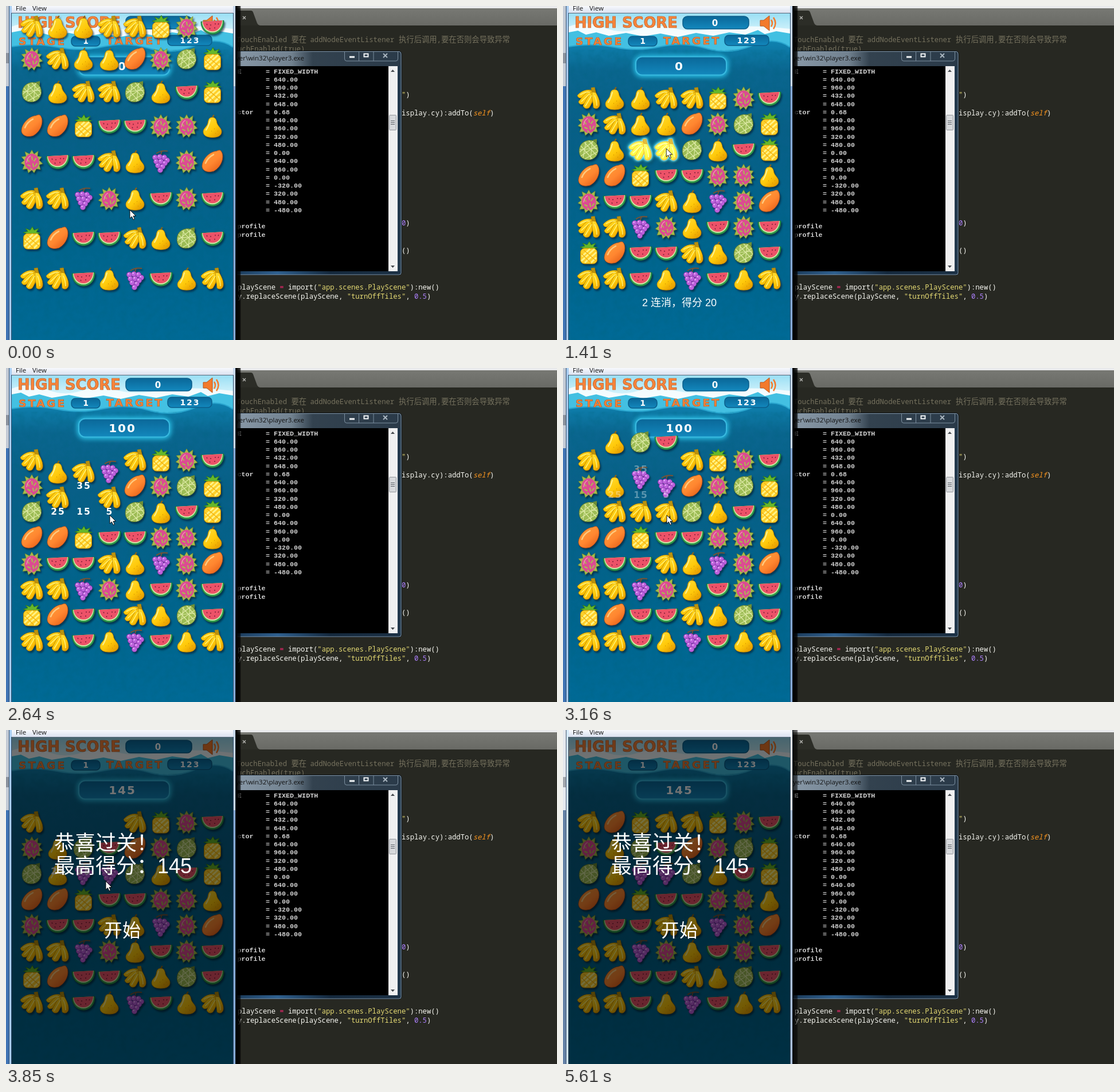
Recreate the animation shown at these times as an HTML page. Size 961 px wide and 583 px high, loop 5710 ms.

```html
<!DOCTYPE html>
<html lang="zh">
<head>
<meta charset="utf-8">
<title>Fruit match</title>
<style>
html, body { margin: 0; width: 100%; height: 100%; overflow: hidden; background: #272822; }
svg { display: block; }
text { white-space: pre; }
.code { font: 12.22px "Noto Sans Mono", "DejaVu Sans Mono", monospace; fill: #f8f8f2; }
.cjk { font: 13.33px "Noto Sans CJK SC", "Noto Sans CJK", sans-serif; }
.note { fill: #75715e; }
.str { fill: #e6db74; }
.num { fill: #ae81ff; }
.op { fill: #f92672; }
.self { fill: #fd971f; font-style: italic; }
.term { font: bold 11.7px "Liberation Mono", "DejaVu Sans Mono", monospace; fill: #d2d2d2; }
.ui { font: 11.5px "Open Sans", "Noto Sans", sans-serif; fill: #111; }
.head { font: bold 25.8px "DejaVu Sans", sans-serif; fill: #f6843a; stroke: #b85a26; stroke-width: .7; }
.sub { font-size: 18.5px; letter-spacing: 3.4px; }
.digits { font: bold 20px "DejaVu Sans", sans-serif; fill: #fff; text-anchor: middle; letter-spacing: 2px; }
.msg { font: 18px "Liberation Sans", "Noto Sans CJK SC", "Noto Sans CJK", sans-serif; fill: #fff; }
.big { font-size: 36px; font-weight: 300; }
#board { filter: drop-shadow(2px 3px 1.5px rgba(0, 25, 45, .6)); }
.lit { filter: saturate(.75) brightness(1.3) drop-shadow(0 0 1px #dff) drop-shadow(0 0 2px #8ff) drop-shadow(0 0 3px #3ce8ff); }
</style>
</head>
<body>
<svg id="stage" width="961" height="583" viewBox="0 0 961 583">
<defs>
  <linearGradient id="bar" x2="0" y2="1"><stop stop-color="#797a75"/><stop offset="1" stop-color="#696a65"/></linearGradient>
  <linearGradient id="menu" x2="0" y2="1"><stop stop-color="#f7f9fd"/><stop offset="1" stop-color="#d8dfee"/></linearGradient>
  <linearGradient id="glass"><stop stop-color="#8d9dac"/><stop offset=".38" stop-color="#71818f"/><stop offset=".5" stop-color="#33424f"/><stop offset="1" stop-color="#2a3a49"/></linearGradient>
  <linearGradient id="base"><stop stop-color="#16304a"/><stop offset=".3" stop-color="#2e5f8e"/><stop offset=".6" stop-color="#14283c"/><stop offset="1" stop-color="#1c3145"/></linearGradient>
  <linearGradient id="sky" x2="0" y2="1"><stop stop-color="#9adff4"/><stop offset=".6" stop-color="#e6f9fe"/><stop offset="1" stop-color="#c8effa"/></linearGradient>
  <linearGradient id="sea" x2="0" y2="1"><stop stop-color="#0f82b0"/><stop offset=".1" stop-color="#0a668f"/><stop offset=".3" stop-color="#085f87"/><stop offset=".7" stop-color="#01658e"/><stop offset="1" stop-color="#006a96"/></linearGradient>
  <linearGradient id="pill" x2="0" y2="1"><stop stop-color="#0a6798"/><stop offset="1" stop-color="#1388bd"/></linearGradient>
  <linearGradient id="shade"><stop stop-color="#000"/><stop offset=".8" stop-color="#000" stop-opacity=".75"/><stop offset="1" stop-color="#000" stop-opacity="0"/></linearGradient>
  <linearGradient id="peel" x2=".8" y2="1"><stop stop-color="#ffe03a"/><stop offset=".6" stop-color="#ffc90a"/><stop offset="1" stop-color="#e59a00"/></linearGradient>
  <linearGradient id="ripe" x2=".8" y2="1"><stop stop-color="#ffa53c"/><stop offset=".6" stop-color="#ff8630"/><stop offset="1" stop-color="#e55f18"/></linearGradient>
  <filter id="glow" x="-20%" y="-50%" width="140%" height="200%"><feGaussianBlur stdDeviation="4"/></filter>
  <filter id="grain" x="0" y="0" width="1" height="1">
    <feTurbulence type="fractalNoise" baseFrequency=".09" numOctaves="3" seed="4"/>
    <feColorMatrix values="0 0 0 0 0  0 0 0 0 .12  0 0 0 0 .2  .9 0 0 0 -.33"/>
  </filter>
  <clipPath id="view"><rect x="10" y="13" width="386" height="570"/></clipPath>

  <g id="B" fill="url(#peel)" stroke="#b98200" stroke-width=".9" stroke-linejoin="round">
    <path d="M6-14C-4-16-13-13-20-5C-19 0-14 1-10-2C-3-7 4-8 8-10Z"/>
    <path d="M6-14C-5-11-10-4-18 6C-17 11-12 12-8 9C0 3 5-4 9-10Z"/>
    <path d="M6-13C-1-6-5 4-10 13C-8 19-2 19 1 16C6 8 9 0 10-10Z"/>
    <path d="M6-12C4 0 8 8 8 16C12 20 18 18 19 12C20 4 15-5 11-12Z"/>
    <path d="M4-18L10-19L12-10L6-11Z" fill="#b8930f"/>
    <path d="M-15-6Q-7-11 2-11M-13 6Q-5-2 2-8M-6 14Q0 4 5-5M14 13Q14 4 10-5" fill="none" stroke="#fff27c" stroke-width="1.5"/>
  </g>
  <g id="P">
    <path d="M0-13Q0-17 3-19" fill="none" stroke="#8a6415" stroke-width="2.2"/>
    <path d="M0-15C6-15 7-10 8-5C10 1 16 4 16 10C16 17 9 20 0 20C-9 20-16 17-16 10C-16 4-9 1-8-5C-7-11-6-15 0-15Z" fill="url(#peel)" stroke="#c08600" stroke-width=".9"/>
    <path d="M-4-10Q-7 1-11 7" fill="none" stroke="#fff08a" stroke-width="2.2" stroke-linecap="round"/>
    <path d="M3 5h1M9 9h1M5 13h1M-2 9h1" stroke="#d39400" stroke-width="1.3"/>
  </g>
  <g id="A">
    <path d="M-3-6L-15-10L-7-12L-11-17L-3-14L1-20L4-14L12-17L8-11L15-9L4-6Z" fill="#66b72a" stroke="#2f7d1c" stroke-width=".9"/>
    <rect x="-14.500" y="-8" width="29" height="27" rx="7" fill="#ffd02a" stroke="#c98c00"/>
    <path d="M-12 6L2-7M-13 14L10-7M-7 17L13-1M3 18L13 8" stroke="#fff387" stroke-width="3"/>
    <path d="M-9-5L13 14M-13 1L4 18" stroke="#f0ad10" stroke-width="1.200"/>
  </g>
  <g id="D">
    <path d="M0-20L4-13L11-18L10-9L17-8L13-2L19 4L13 6L15 14L8 13L4 20L0 15L-6 20L-8 13L-16 14L-13 6L-19 3L-13-2L-18-8L-10-9L-12-17L-4-13Z" fill="#a4bb4c" stroke="#72852c" stroke-width=".7"/>
    <ellipse cy="1" rx="12.500" ry="14.500" fill="#dc4b92"/>
    <path d="M-8-4l3 4M0-8l1 5M7-5l-3 4M-7 6l4 2M2 4l1 5M9 4l-3 4M-2 12l2 2" stroke="#a8bf4f" stroke-width="2" stroke-linecap="round"/>
    <path d="M-9 2Q-8-7-2-10" fill="none" stroke="#f487b6" stroke-width="1.500"/>
  </g>
  <g id="W">
    <path d="M-20-9L20-11C21 4 11 13 0 13C-11 13-20 4-20-9Z" fill="#2e9a4c" stroke="#1a6c37" stroke-width=".8"/>
    <path d="M-18-9L18-11C18 2 10 10 0 10C-10 10-18 2-18-9Z" fill="#cfe9a6"/>
    <path d="M-17-9L17-11C16 1 9 8 0 8C-9 8-16 1-17-9Z" fill="#ec5268"/>
    <path d="M-10-5l1 2M-3-4l0 2M5-6l0 2M11-6l-1 2M-5 2l1 2M4 1l0 2" stroke="#7c1f38" stroke-width="1.500"/>
  </g>
  <g id="M">
    <path d="M15-18C22-9 16 10 2 17C-8 20-17 17-18 9C-18-4-5-17 7-18C11-20 14-20 15-18Z" fill="url(#ripe)" stroke="#b9501a" stroke-width=".9"/>
    <path d="M-12 3Q-8-7 2-12" fill="none" stroke="#ffcb80" stroke-width="2.500" stroke-linecap="round"/>
  </g>
  <g id="L">
    <path d="M6-17L14-19L14-11Z" fill="#6e8f36"/>
    <path d="M9-15C17-10 19 2 13 11C8 18-5 20-12 14C-19 8-18-5-12-11C-6-17 3-18 9-15Z" fill="#9dbc55" stroke="#5f7d30"/>
    <path d="M-14-7L6 16M-8-13L13 9M0-16L16 2M-16 4L8-15M-14 11L14-8M-7 16L16 3M-5-14L-10 14M6-15L3 17M-16 0L15-3" fill="none" stroke="#dce9a4" stroke-width="1.200"/>
  </g>
  <g id="G">
    <path d="M-1-10L2-18M-8-14Q0-20 12-18" fill="none" stroke="#7b5232" stroke-width="1.800"/>
    <g id="berries" fill="#bd62dc" stroke="#7f35a4" stroke-width=".7"/>
  </g>
</defs>

<rect width="961" height="583" fill="#272822"/>
<rect width="961" height="34" fill="url(#bar)"/>
<rect width="961" height="4" fill="#e9eaec"/>
<path d="M396 8H427Q430 8 431 11L438 30Q440 34 444 34H396Z" fill="#2c2d27"/>
<path d="M413 18l5 5m0-5l-5 5" stroke="#b9b9b5" stroke-width="1.300"/>
<text class="code note" y="63"><tspan x="402">TouchEnabled</tspan><tspan class="cjk" x="497.500">要在</tspan><tspan x="530.500">addNodeEventListener</tspan><tspan class="cjk" x="685">执行后调用</tspan><tspan x="751.500">,</tspan><tspan class="cjk" x="759">要在否则会导致异常</tspan></text>
<text class="code note" x="404" y="79">uchEnabled(true)</text>
<text class="code" x="690" y="159"><tspan class="str">"</tspan>)</text>
<text class="code" x="690" y="191">isplay.cy):addTo(<tspan class="self">self</tspan>)</text>
<text class="code" x="690" y="383"><tspan class="num">0</tspan>)</text>
<text class="code" x="690" y="431">()</text>
<text class="code" x="404" y="495">playScene <tspan class="op">=</tspan> import(<tspan class="str">"app.scenes.PlayScene"</tspan>):new()</text>
<text class="code" x="404" y="511">y.replaceScene(playScene, <tspan class="str">"turnOffTiles"</tspan>, <tspan class="num">0.5</tspan>)</text>

<g id="console">
  <rect x="380" y="78.500" width="310" height="391" rx="5" fill="#22384c" stroke="#0b1117"/>
  <rect x="381" y="80" width="308" height="25" rx="4" fill="url(#glass)"/>
  <rect x="381" y="463" width="308" height="6" fill="url(#base)"/>
  <path d="M400 79.500H686Q689 80 689 84V466Q689 469 685 469H400" fill="none" stroke="#9db2c4" stroke-opacity=".8"/>
  <text class="ui" x="401" y="95">yer\win32\player3.exe</text>
  <path d="M590.500 79V92Q590.500 96 594 96H680Q683.500 96 683.500 92V79M615.500 80V96M641 80V96" fill="none" stroke="#7d90a0"/>
  <path d="M599 89h9" stroke="#f3f6f8" stroke-width="3"/>
  <rect x="624.500" y="83.500" width="7" height="5" fill="none" stroke="#f3f6f8" stroke-width="2"/>
  <path d="M658 83l7 7m0-7l-7 7" stroke="#a9b5bf" stroke-width="2"/>
  <rect x="390" y="105" width="293" height="358" fill="#000"/>
  <rect x="667" y="105" width="16" height="358" fill="#f0f0f1"/>
  <rect x="668.500" y="190.500" width="12" height="26" rx="1" fill="#d7d9dc" stroke="#93979c"/>
  <path d="M671 200.500h7m-7 3h7m-7 3h7" stroke="#5b6066"/>
  <path d="M671 115l3.500-4 3.500 4zM671 453l3.500 4 3.500-4z" fill="#45494e"/>
  <g id="log" class="term"></g>
</g>

<rect id="edge" x="401" width="9" height="583" fill="url(#shade)"/>
<g id="frame">
  <rect width="401" height="583" fill="#c9d9ec"/>
  <rect width="5" height="140" fill="#c3cad5"/>
  <rect y="82" width="5" height="18" fill="#8b929d"/>
  <rect y="140" width="5" height="443" fill="#3f73b4"/>
  <rect x="5" width="5" height="583" fill="#a9cdf0"/>
  <rect x="396" y="140" width="4" height="443" fill="#86abd8"/>
  <path d="M5.500 0V583M9.500 12V583M396.500 12V583" stroke="#34506f"/>
</g>
<path d="M400.500 0V583" stroke="#10161c"/>
<rect x="10" width="386" height="13" fill="url(#menu)"/>
<path d="M10 12.500H396" stroke="#58697b"/>
<text class="ui" x="17" y="8">File</text><text class="ui" x="46" y="8">View</text>

<g clip-path="url(#view)">
  <rect x="10" y="13" width="386" height="70" fill="url(#sky)"/>
  <path d="M10 36Q40 24 70 37T130 40T190 38T250 42T310 36T396 40V60H10Z" fill="#fff" opacity=".75"/>
  <path d="M10 46L26 43L40 50L58 46L80 52L110 47L140 53L170 48L200 54L232 47L262 52L290 46L318 50L340 42L352 49L372 44L396 48V90H10Z" fill="#43c0e2"/>
  <path d="M10 71Q50 64 90 72T170 71T250 74T330 69T396 72V583H10Z" fill="url(#sea)"/>
  <path d="M10 71Q50 64 90 72T170 71T250 74T330 69T396 72" fill="none" stroke="#2aa6cf" stroke-width="2"/>
  <rect x="10" y="76" width="386" height="507" filter="url(#grain)" opacity=".55"/>
  <text class="head" x="20" y="38">HIGH SCORE</text>
  <text class="head sub" x="22" y="68">STAGE</text>
  <text class="head sub" x="175" y="67">TARGET</text>
  <g fill="url(#pill)" stroke="#0b5d8a" stroke-width="1.500">
    <rect x="209" y="18" width="115" height="22" rx="8"/>
    <rect x="114" y="53" width="50" height="17" rx="7"/>
    <rect x="282" y="51" width="77" height="18" rx="7"/>
  </g>
  <rect x="124" y="86" width="164" height="38" rx="14" fill="#2cc3ea" filter="url(#glow)"/>
  <rect x="127" y="88.500" width="158" height="32" rx="11" fill="url(#pill)" stroke="#39b9df" stroke-width="2"/>
  <g class="digits">
    <text x="266" y="34.500" font-size="15">0</text>
    <text x="140" y="66" style="font-size:14px">1</text>
    <text x="321" y="65" style="font-size:14px">123</text>
    <text id="score" x="203" y="112">0</text>
  </g>
  <path d="M344 25h6l10-8v26l-10-8h-6z" fill="#f37a2b" stroke="#b9541b"/>
  <path d="M363 24q4 6 0 12M367 20q7 10 0 20" fill="none" stroke="#f37a2b" stroke-width="2.500"/>
  <g id="board"></g>
  <g id="pops" class="digits"></g>
  <text id="msg" class="msg" x="203" y="524" text-anchor="middle"></text>
  <g id="dialog">
    <rect x="10" y="13" width="386" height="570" opacity=".55"/>
    <text class="msg big" x="84" y="210">恭喜过关！</text>
    <text class="msg big" x="84" y="250">最高得分：145</text>
    <text class="msg big" x="203" y="361" text-anchor="middle" style="font-size:32px">开始</text>
  </g>
</g>
<path id="cursor" d="M0 0V14.500L3.400 11.500L6 17L8.300 16L6 10.500H10.500Z" fill="#fff" stroke="#000" stroke-width=".9"/>
</svg>
<script>
const LOOP = 5710, HALF = 290, SPEED = .579;
const byId = id => document.getElementById(id);
const add = (parent, tag, attrs = {}, text) => {
  const el = document.createElementNS('http://www.w3.org/2000/svg', tag);
  for (const k in attrs) el.setAttribute(k, attrs[k]);
  if (text !== undefined) el.textContent = text;
  return parent.appendChild(el);
};
const show = (el, on) => el.setAttribute('display', on ? 'inline' : 'none');
const colX = c => 45 + 45 * c, rowY = r => 161 + 45 * r;

// Screen refresh times
const ticks = [0, 130, 270, 400, 550, 680, 830, 990, 1140, 1290, 1410, 1530, 1680, 1830, 1960, 2100, 2220,
  2370, 2500, 2640, 2770, 2920, 3040, 3160, 3310, 3450, 3580, 3700, 3850, 4000, 4130, 4280, 4400, 4520,
  4670, 4820, 4940, 5060, 5610];

const path = [[0, 216, 356], [400, 216, 356], [680, 186, 347], [830, 180, 340], [990, 173, 297], [1140, 178, 256],
  [1290, 180, 250], [1960, 181, 243], [2220, 181, 243], [2640, 181, 257], [3450, 181, 257], [3700, 174, 260],
  [3850, 174, 264], [4130, 181, 282], [4400, 192, 307], [4520, 202, 336], [4670, 205, 346], [4820, 300, 420],
  [4940, 665, 570]];

// Each clear: picked cells as [column, row], new fruit per column from the top
const clears = [
  { lit: 1290, at: 1490, cells: [[3, 2], [2, 2]], fresh: { 2: 'B', 3: 'G' } },
  { lit: 2370, at: 2605, cells: [[3, 2], [2, 2], [1, 2], [2, 1]], fresh: { 1: 'P', 2: 'LG', 3: 'W' } },
  { lit: 3520, at: 3740, cells: [[3, 2], [2, 2], [1, 2]], fresh: { 1: 'M', 2: 'A', 3: 'B' } }
];
const layout = ['BPPBBADW', 'DBPPMDLA', 'LPBBLPWA', 'MMAWWDDP', 'DWWBPGDM', 'BBGDPWDW', 'AMWWBPLW', 'BBWPGWPB'];

const berries = byId('berries');
[[-10, -7], [-2, -8], [6, -7], [11, -2], [-8, 0], [0, 0], [7, 3], [-5, 7], [3, 9], [-1, 15]].forEach(([x, y]) => {
  add(berries, 'circle', { cx: x, cy: y, r: 4.6 });
  add(berries, 'circle', { cx: x - 1.3, cy: y - 1.5, r: 1.2, fill: '#ecb8fa', stroke: 'none' });
});

const values = 'FIXED_WIDTH 640.00 960.00 432.00 648.00 0.68 640.00 960.00 320.00 480.00 0.00 640.00 960.00 0.00 -320.00 320.00 480.00 -480.00';
const logLine = (i, x, text) => add(byId('log'), 'text', { x, y: 117.5 + 14.25 * i }, text);
values.split(' ').forEach((v, i) => logLine(i, 453, '= ' + v));
logLine(0, 403.5, 'E');
logLine(5, 403.5, 'ctor');
logLine(19, 403.5, 'profile');
logLine(20, 403.5, 'profile');

const fruits = [], pops = [];
function spawn(kind, c, r, at) {
  const to = rowY(r);
  const f = { c, born: at, lit: Infinity, dies: Infinity, el: add(byId('board'), 'use', { href: '#' + kind }),
    moves: [{ at, from: to - HALF, to, dur: (592 - to + HALF) / (2 * SPEED) }] };
  fruits.push(f);
  return f;
}
const columns = [...Array(8).keys()].map(c => layout.map((row, r) => spawn(row[c], c, r, -355)));

let total = 0;
for (const step of clears) {
  step.gain = 0;
  step.cells.forEach(([c, r], i) => {
    const points = 5 + 10 * i;
    step.gain += points;
    Object.assign(columns[c][r], { lit: step.lit, dies: step.at });
    pops.push({ c, r, at: step.at, el: add(byId('pops'), 'text', { style: 'font-size:15.5px' }, points) });
  });
  step.total = total += step.gain;
  for (const c in step.fresh) {
    const rest = columns[c].filter(f => f.dies > step.at);
    const fresh = [...step.fresh[c]].map((kind, r) => spawn(kind, +c, r, step.at));
    rest.forEach((f, i) => {
      const from = f.moves[f.moves.length - 1].to, to = rowY(i + fresh.length);
      if (to > from) f.moves.push({ at: step.at, from, to, dur: (to - from) / SPEED });
    });
    columns[c] = fresh.concat(rest);
  }
}

function cursorAt(t) {
  const i = path.findIndex(p => p[0] > t);
  if (i < 0) return path[path.length - 1].slice(1);
  const [a, b] = [path[i - 1], path[i]], k = (t - a[0]) / (b[0] - a[0]);
  return [1, 2].map(n => a[n] + (b[n] - a[n]) * k);
}

function draw(t) {
  for (const f of fruits) {
    const alive = t >= f.born && t < f.dies;
    show(f.el, alive);
    if (!alive) continue;
    const m = f.moves.filter(m => m.at <= t).pop();
    const k = Math.min(1, (t - m.at) / m.dur);
    f.el.setAttribute('transform', `translate(${colX(f.c)} ${m.from + (m.to - m.from) * k})`);
    f.el.setAttribute('class', t >= f.lit ? 'lit' : '');
  }
  for (const p of pops) {
    const k = (t - p.at) / 800;
    show(p.el, k >= 0 && k < 1);
    p.el.setAttribute('x', colX(p.c) + 1);
    p.el.setAttribute('y', rowY(p.r) + 5.5 - 45 * Math.max(0, k - .04));
    p.el.setAttribute('opacity', Math.max(0, Math.min(1, 1.04 - k)));
  }
  const done = clears.filter(s => s.at <= t).pop();
  const picked = clears.find(s => s.lit <= t && t < s.at);
  byId('score').textContent = done ? done.total : 0;
  byId('msg').textContent = picked ? `${picked.cells.length} 连消，得分 ${picked.gain}` : '';
  show(byId('dialog'), t >= 3850);
  const [x, y] = cursorAt(t);
  byId('cursor').setAttribute('transform', `translate(${x} ${y})`);
  show(byId('cursor'), t < 5060);
  const idle = t >= 5610;
  byId('frame').style.filter = idle ? 'saturate(.5) brightness(1.15)' : '';
  byId('edge').setAttribute('opacity', idle ? .7 : 1);
}

let last = -1;
function tick(now) {
  const t = now % LOOP;
  const step = ticks.filter(s => s <= t).pop();
  if (step !== last) draw(last = step);
  requestAnimationFrame(tick);
}
const start = performance.now();
draw(0);
requestAnimationFrame(function run() {
  tick(Math.max(0, performance.now() - start));
});
</script>
</body>
</html>
```
